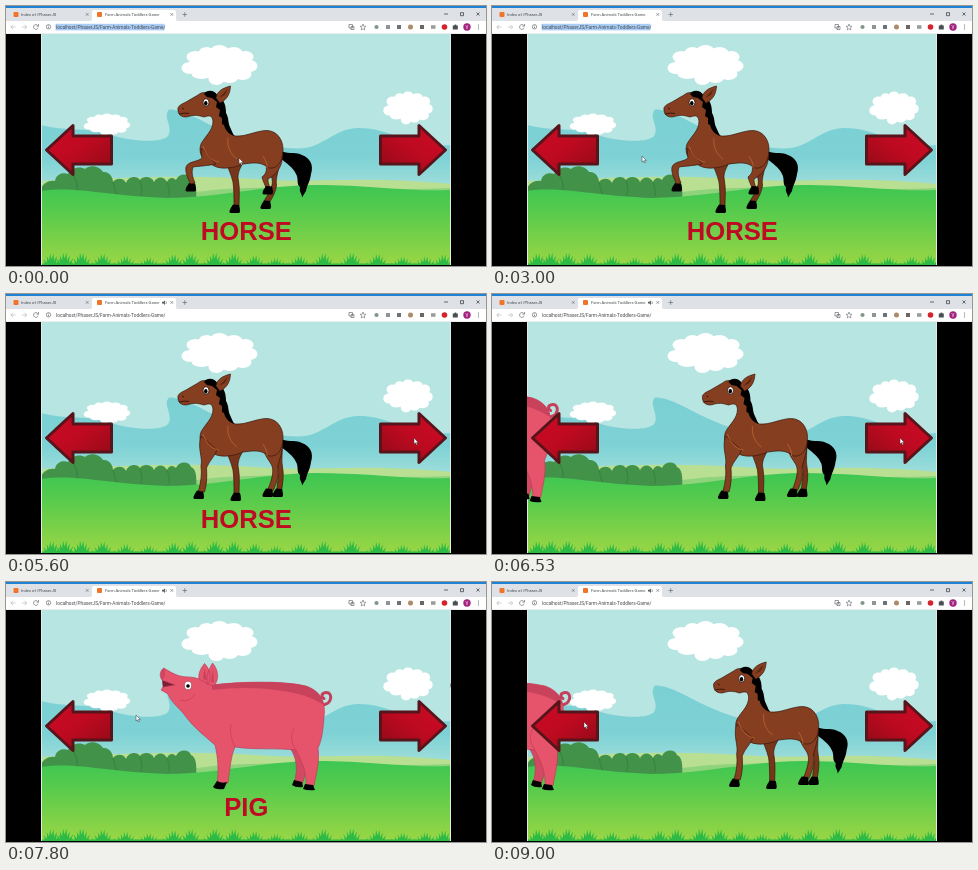
An HTML page for the animation above (9.07 s loop, 480 px wide and 260 px high).

```html
<!DOCTYPE html>
<html lang="en">
<head>
<meta charset="utf-8">
<title>Farm Animals Toddlers Game</title>
<style>
  html, body { margin: 0; width: 100%; height: 100%; overflow: hidden; background: #000; }
  svg { display: block; width: 100vw; height: 100vh; }
  .ui { font-family: Roboto, "Open Sans", sans-serif; fill: #45494d; }
  .tab { font-size: 4.15px; }
  .icon { fill: none; stroke: #6a6e73; stroke-width: .7; }
  .coat { fill: #863e20; stroke: #3b170c; stroke-width: .7; stroke-linejoin: round; }
  .far { fill: #773519; }
  .pink { fill: #e5546a; stroke: #b8385a; stroke-width: .6; stroke-linejoin: round; }
  #label { font: bold 25.6px "Liberation Sans", Arial, sans-serif; fill: #bf0a24; text-anchor: middle; }
</style>
</head>
<body>
<svg viewBox="0 0 480 260" preserveAspectRatio="none">
  <defs>
    <clipPath id="view"><rect x="35" y="28" width="410" height="231"/></clipPath>
    <linearGradient id="field" x1="0" y1="178" x2="0" y2="259" gradientUnits="userSpaceOnUse">
      <stop offset="0" stop-color="#3cc653"/><stop offset=".35" stop-color="#58cb4c"/><stop offset="1" stop-color="#9ad645"/>
    </linearGradient>
    <linearGradient id="hills" x1="0" y1="103" x2="0" y2="185" gradientUnits="userSpaceOnUse">
      <stop offset="0" stop-color="#7bd0d4"/><stop offset=".6" stop-color="#7ed2d5"/><stop offset="1" stop-color="#a5e0dc"/>
    </linearGradient>
    <linearGradient id="red" x1="0" y1="0" x2="1" y2="1">
      <stop offset="0" stop-color="#cf0a26"/><stop offset=".5" stop-color="#bd0a20"/><stop offset="1" stop-color="#8e0a16"/>
    </linearGradient>
    <g id="cloud" fill="#fff">
      <ellipse rx="31" ry="14"/>
      <ellipse cx="-30" cy="3" rx="8" ry="6"/><ellipse cx="-24" cy="-8" rx="9" ry="6"/>
      <ellipse cx="-13" cy="-12" rx="8" ry="6"/><ellipse cx="0" cy="-14" rx="9" ry="6"/>
      <ellipse cx="14" cy="-12" rx="9" ry="6"/><ellipse cx="26" cy="-8" rx="8" ry="6"/>
      <ellipse cx="30" cy="1" rx="8" ry="6"/><ellipse cx="23" cy="9" rx="9" ry="6"/>
      <ellipse cx="10" cy="12" rx="9" ry="6"/><ellipse cx="-3" cy="14" rx="8" ry="6"/><ellipse cx="-18" cy="9" rx="10" ry="5"/>
    </g>
    <path id="arrow" d="M40.500 144L67 119.500V130H105.500V158H67V168.500Z" fill="url(#red)" stroke="#57141a" stroke-width="3" stroke-linejoin="round"/>
  </defs>

  <!-- browser bar -->
  <rect width="480" height="28" fill="#dee1e6"/>
  <rect width="480" height="2" fill="#1f83d6"/>
  <path d="M84 15C86 15 86 14 86 12V6Q86 4 88 4H168Q170 4 170 6V12C170 14 170 15 172 15H480V28H0V15Z" fill="#fff"/>
  <g fill="#f0752b"><rect x="7.500" y="6" width="5" height="5" rx="1"/><rect x="91" y="6" width="5" height="5" rx="1"/></g>
  <text class="ui tab" x="15" y="10.200">Index of /PhaserJS</text>
  <text class="ui tab" x="99" y="10.200">Farm Animals Toddlers Game</text>
  <g id="speaker"><path d="M156 7.800H157.300L159 6.400V11L157.300 9.600H156Z" fill="#5f6368"/><path d="M159.900 7.400Q161 8.700 159.900 10" class="icon" stroke-width=".6"/></g>
  <g class="icon">
    <path d="M80 7.200L82.500 9.700M82.500 7.200L80 9.700M164.500 7.200L167 9.700M167 7.200L164.500 9.700M176.500 8.500H181M178.700 6.200V10.800"/>
    <path d="M438 8H442M454.500 6.700H457.500V9.700H454.500ZM470.500 6.500L473.500 9.500M473.500 6.500L470.500 9.500" stroke="#333"/>
    <path d="M9.500 21H4.800M7 18.800L4.800 21L7 23.200M16 21H20.700M18.500 18.800L20.700 21L18.500 23.200" stroke="#b5b8bb"/>
    <path d="M32 19.700A2.400 2.400 0 1 0 32.200 21.800M32.500 18V20.200H30.400"/>
    <circle cx="42.500" cy="20.800" r="2.200"/><path d="M42.500 20.500V22.200M42.500 19.300V19.800"/>
    <path d="M343 18.500H346.500V22H343ZM345 20.500H348V23.500H345Z"/>
    <path d="M357 18L357.800 20.200L360 20.300L358.300 21.700L358.900 24L357 22.700L355.100 24L355.700 21.700L354 20.300L356.200 20.200Z" stroke-width=".6"/>
  </g>
  <rect id="selection" x="49.500" y="17.800" width="109" height="6.600" fill="#a9cdf5"/>
  <text class="ui" x="50" y="22.500" font-size="4.800">localhost/PhaserJS/Farm-Animals-Toddlers-Game/</text>
  <circle cx="370.500" cy="21" r="2.100" fill="#7f9689"/>
  <rect x="380" y="19" width="4" height="4" fill="#8f9496"/>
  <rect x="391" y="19" width="4" height="4" fill="#6d7276"/>
  <circle cx="404.500" cy="21" r="2.500" fill="#b08a66"/>
  <rect x="414" y="19" width="4" height="4" fill="#6f665f"/>
  <rect x="425" y="19.200" width="4.500" height="3.600" fill="#9a9c9e"/>
  <circle cx="438.500" cy="21" r="2.800" fill="#d5232b"/>
  <path d="M446.800 19.500H448.300A1.100 1.100 0 0 1 450.500 19.500H451.800V23.500H446.800Z" fill="#4a4e52"/>
  <circle cx="461" cy="21" r="3.700" fill="#a3217f"/>
  <text x="461" y="22.600" font-size="4.500" fill="#fff" text-anchor="middle" font-family="Roboto, sans-serif">V</text>
  <g fill="#5f6368"><circle cx="472.500" cy="19" r=".6"/><circle cx="472.500" cy="21" r=".6"/><circle cx="472.500" cy="23" r=".6"/></g>
  <rect y="27.500" width="480" height=".5" fill="#d5d8db"/>
  <rect y="28" width="480" height="232"/>

  <!-- game -->
  <g clip-path="url(#view)">
    <rect x="35" y="28" width="410" height="231" fill="#b7e5e2"/>
    <path d="M35 119C55 125 80 121 102 128C122 135 154 138 162 130C168 121 156 111 163 103.500C190 103 222 141 292 142.500C317 142.500 327 123 351 122C385 121 400 142 445 139V190H35Z" fill="url(#hills)"/>
    <use href="#cloud" transform="translate(213.500 59)"/>
    <use href="#cloud" transform="translate(101 118.500) scale(.61 .55)"/>
    <use href="#cloud" transform="translate(402 102) scale(.65 .82)"/>
    <path d="M35 175C110 172 180 168 250 173C310 178 350 169 445 178V195H35Z" fill="#b9df92"/>
    <path d="M190 186C260 176 350 186 445 182V195H190Z" fill="#8fd37d"/>
    <path d="M35 195V183C37 177 43 174 49 175C50 168 57 166 62 168C65 161 75 160 79 163C84 158 94 160 97 166C103 165 107 171 107 176C111 171 118 172 120 177C122 170 131 169 134 174C138 169 146 171 148 176C151 170 158 170 161 176C163 171 167 171 170 174C173 167 183 167 185 173C190 175 191 182 190 195Z" fill="#43924a"/>
    <path d="M107 176C109 181 108 186 112 190M134 175Q137 183 135 190M161 176Q164 184 163 190M66 168Q72 174 71 185" fill="none" stroke="#37853f" stroke-width="1.200"/>
    <path d="M35 185C70 180 100 190 160 192C220 191 250 180 310 179C365 179 405 186 445 184V259H35Z" fill="url(#field)"/>
    <path id="grass" fill="#2dbb46"/>
    <path d="M35.500 28V259M444.500 28V259" stroke="#dcebe6"/>

    <g id="pig">
      <path d="M284 166C291 176 292 188 288 201L296 203C300 191 303 180 304 170Z" fill="#d14a62" stroke="#b8385a" stroke-width=".6"/>
      <path d="M315 123C327 123 327 110 320 110.500C315 111 315 115 318 116.500" fill="none" stroke="#c43f5a" stroke-width="3" stroke-linecap="round"/>
      <path d="M156 98L171 103L157 107Z" fill="#7c1f34"/>
      <path class="pink" d="M158 86C164 90 172 95 182 95C190 95 197 98 206 103C230 100 275 98 300 104C315 109 320 121 318 135C317 148 316 158 312 166C314 180 310 192 308 204L300 205C301 192 297 182 290 168C272 166 248 168 229 165C225 174 224 186 222 201H211C213 190 212 175 209 163C200 155 188 146 180 135C174 126 166 122 162 112L155 108L157 105L169 103L156 98C153 94 154 88 158 86Z"/>
      <path d="M206 103C230 100 275 98 300 104C311 108 317 115 318 123C306 116 296 112 280 109.500C255 105 230 105 206 108Z" fill="#c9425c"/>
      <ellipse cx="157" cy="92" rx="2" ry="5.500" fill="#cf4660" transform="rotate(8 157 92)"/>
      <path class="pink" d="M193 97C192 91 195 86 198.500 81.500C204 87 206 95 202 102ZM201 102C200 94 203 87 206.500 81C212 87 214 97 208 104Z"/>
      <path d="M197 97L198.500 86L201 98ZM205 100L207 86L208 100Z" fill="#c9425c"/>
      <ellipse cx="182" cy="103.500" rx="3.600" ry="4.200" fill="#fff" stroke="#7c1f34" stroke-width=".5"/>
      <circle cx="182" cy="104" r="1.800"/>
      <path d="M174 118Q184 121 189 112M229 165Q223 153 225 142M290 168Q282 158 288 146" fill="none" stroke="#c43f5a" stroke-width=".7"/>
      <path d="M211 199Q216 202 221 200L218 207Q210 208 207 205ZM288 198L296 200L297 205Q290 206 286 203ZM299 202L307 203L309 208Q302 209 297 207Z"/>
    </g>

    <g id="horse">
      <path d="M274 144C280 149 288 145 296 149C304 152 308 159 305 168C304 176 301 179 300 185L296 191.500C296 187 293 187 294 181C290 178 293 173 290 168C287 161 281 158 274 152Z"/>
      <g id="legs"></g>
      <path class="coat" d="M172 104C171 100 176 98 180 96L192 89C196 85.500 201 86 205 88C212 92 215 100 216 108C218 118 222 126 229 130C240 131 250 124.500 261 124.500C273 125 279 137 276.500 149C275 158 270 163 263 162C254 155 247 157 237 158C226 163 212 164 205 158C196 155 192 146 195 138C199 130 207 125 207 115C206 108 202 110 198 111C192 109 188 109 184 110C178 112.500 172 110 172 104Z"/>
      <path id="front" class="coat"/>
      <path d="M197 140C200 150 206 155 213 156M222 132C221 140 224 148 231 153M257 150Q262 158 261 162" fill="none" stroke="#b8602f" stroke-width=".9"/>
      <path d="M198 88C201 83 209 84 212 90C219 94 220 101 220 107C223 112 222 117 224 121L228 130C222 128 219 123 218 119L216 118L216 112L213 110L214 104L210 101L211 96L206 92L201 91Z"/>
      <path class="coat" d="M210 92C211 85 217 82 224.500 80C224 87 222 93 214 97Z"/>
      <path d="M213 92L222 82.500L219 89Z" fill="#5b2612"/>
      <ellipse cx="200" cy="96.500" rx="3" ry="3.800" fill="#fff" stroke="#2a0f08" stroke-width=".8"/>
      <ellipse cx="199.800" cy="97.300" rx="1.700" ry="2.200"/>
      <path d="M173 108Q178 106.500 183 107.500M176 102L178 103" fill="none" stroke="#3b170c"/>
    </g>

    <text id="label" x="240.300" y="234.300"></text>
    <use href="#arrow"/>
    <use href="#arrow" transform="matrix(-1 0 0 1 480 0)"/>
  </g>
  <path id="cursor" d="M0 0V6L1.400 4.800L2.400 7L3.400 6.500L2.500 4.400H4.300Z" fill="#fff" stroke="#333" stroke-width=".5"/>
</svg>
<script>
const LOOP = 9070;
const TAP = 3800, BEAT = 1000 / 3, GAIT = [0, 1, 2, 1, 0, 1];
const TO_PIG = 6390, TO_HORSE = 8183, SLIDE = 1000;
const HORSE_RUN = 273, PIG_RUN = 302;

// time, x, y
const CURSOR = [
  [0, 233, 152], [990, 233, 152], [1000, 235, 152], [1729, 235, 152],
  [1730, 160, 189], [2270, 160, 189], [2800, 150, 150], [3000, 150, 150],
  [3130, 165, 146], [3270, 165, 146], [3800, 218, 141], [5000, 218, 141],
  [5500, 408, 144], [7500, 408, 144], [7800, 130, 133], [8000, 92, 140], [LOOP, 92, 140]
];

const $ = id => document.getElementById(id);
const clamp = v => Math.min(1, Math.max(0, v));
const move = (el, x, y = 0) => el.setAttribute("transform", `translate(${x.toFixed(2)} ${y.toFixed(2)})`);
const show = (el, on) => el.setAttribute("visibility", on ? "visible" : "hidden");

const farFront = "M220 156L238 155C233 164 231 168 232.500 175C234 184 233 192 233 200L228 200C228 192 228 184 227 176C225 168 222 162 220 156Z";
const nearFront = "M195 142C191 154 197 163 195 172C196 180 195 188 192.500 197L198.500 198C201 190 201 182 200.500 174C203 167 209 162 211 156Z";
const hind = "M257 152C258 162 264 167 266 172C268 177 266 186 262 195L267 197C271 188 273 181 271.500 174C273 166 277 158 276.500 148Z";
const farHind = "M262 156C267 166 272 169 272 174C274 180 271 188 271 196L275.500 197C277 188 278 180 276.500 173C275 166 277 158 276 148Z";
const bentHind = "M258 152C262 163 261 167 256 171C257 176 260 180 260 183L264.500 182C262 178 262 175 262 173C271 168 277 160 276.500 148Z";
const backHind = "M258 156C266 168 267 174 266 179C264 186 261 190 258 195L262.500 198C267 191 270 185 270.500 179C269 172 274 162 274 152Z";
const bentFront = "M195 142L210 158C200 160 193 160 187 161C185 167 187 172 189 177L184.500 178C182 172 179 167 180 161C182 155 192 156 196 152Z";
const bentFarFront = "M224 152L236 157C230 165 222 166 216 167C214 172 215 176 217 181L212.500 182C210 175 209 170 210 165C212 160 220 160 224 152Z";

// rear shapes, near front leg, hoof centres
const POSES = [
  { rear: [farFront, backHind, bentHind], front: bentFront, hooves: [[185, 181.5], [229, 203], [262, 184.5], [260, 199]] },
  { rear: [farFront, farHind, hind], front: nearFront, hooves: [[193, 201], [230, 203], [262, 199], [272, 199]] },
  { rear: [bentFarFront, farHind, hind], front: nearFront, hooves: [[193, 201], [214, 185], [262, 199], [272, 199]] }
];

const hoof = ([x, y]) =>
  `<path d="M${x - 2} ${y - 4.5}L${x + 4} ${y - 4}Q${x + 6} ${y + 3} ${x + 4} ${y + 4}H${x - 4}Q${x - 8} ${y + 4} ${x - 2} ${y - 4.5}Z"/>`;

let pose = -1;
function setPose(n) {
  if (n === pose) return;
  pose = n;
  const { rear, front, hooves } = POSES[n];
  $("legs").innerHTML =
    rear.map((d, i) => `<path class="coat${i < 2 ? " far" : ""}" d="${d}"/>`).join("") + hooves.map(hoof).join("");
  $("front").setAttribute("d", front);
}

function growGrass() {
  const tufts = [44, 57, 74, 95, 118, 141, 166, 183, 207, 226, 247, 268, 292, 316, 344, 370, 395, 418, 436];
  let d = "M35 259V257.500H445V259Z";
  for (const x of tufts) {
    const h = 8 + 6 * Math.abs(Math.sin(x * .0232));
    for (let k = -3; k <= 3; k++) {
      const root = x + k * 2, top = 259 - h * (1 - Math.abs(k - .5) * .2);
      d += `M${root - 2.5} 259Q${root} ${top + 6} ${x + k * 3.4} ${top.toFixed(1)}Q${root + 2} ${top + 6} ${root + 2.5} 259Z`;
    }
  }
  $("grass").setAttribute("d", d);
}

function cursorAt(t) {
  const i = CURSOR.findIndex(k => k[0] > t);
  const [t0, x0, y0] = CURSOR[i - 1], [t1, x1, y1] = CURSOR[i];
  const p = (t - t0) / (t1 - t0), e = p * p * (3 - 2 * p);
  return [x0 + (x1 - x0) * e, y0 + (y1 - y0) * e];
}

function draw() {
  const t = performance.now() % LOOP;
  const out = clamp((t - TO_PIG) / SLIDE), back = clamp((t - TO_HORSE) / SLIDE);
  const away = t < TO_HORSE ? out : 1 - back;
  const pigLeft = t < TO_HORSE ? 1 - out : back;
  move($("horse"), HORSE_RUN * away);
  move($("pig"), -PIG_RUN * pigLeft);
  setPose(t < TAP ? 0 : GAIT[Math.min(5, Math.floor((t - TAP) / BEAT))]);
  $("label").textContent = t < TO_PIG ? "HORSE" : out === 1 && back === 0 ? "PIG" : "";
  show($("selection"), t < TAP);
  show($("speaker"), t >= 4000);
  move($("cursor"), ...cursorAt(t));
  requestAnimationFrame(draw);
}

growGrass();
draw();
</script>
</body>
</html>
```
